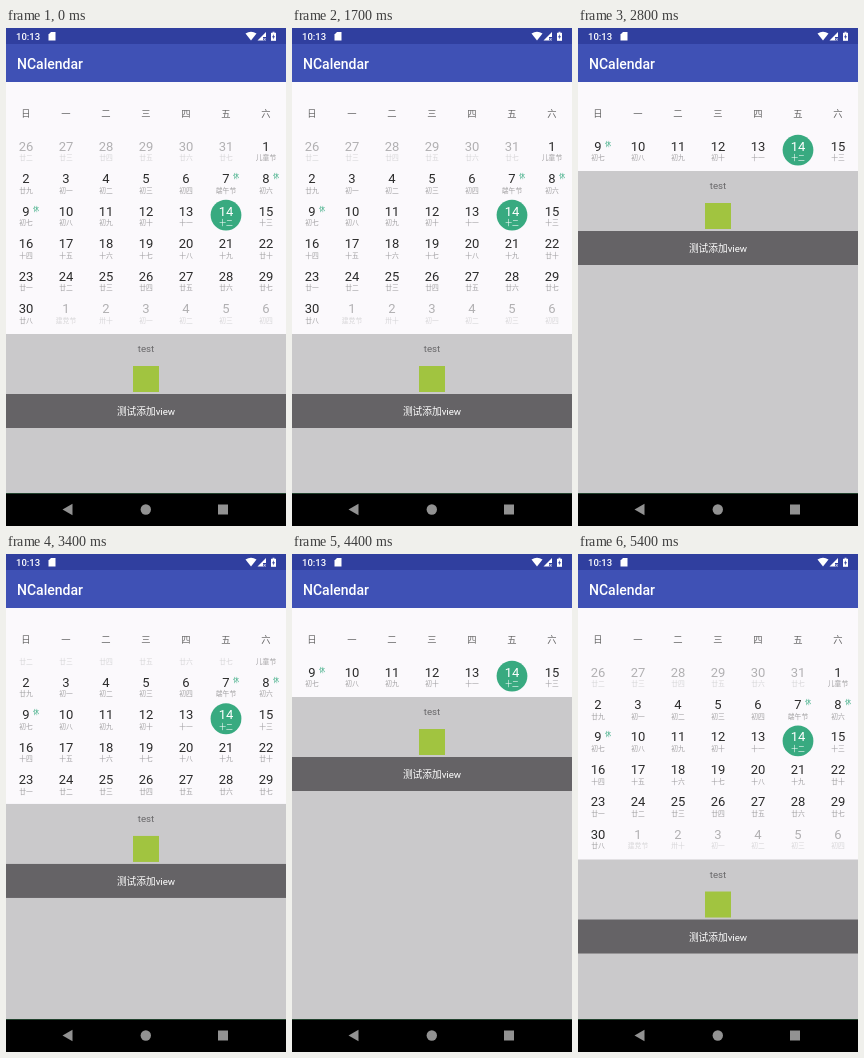
These frames come from a looping animation (280x498 px, 8000 ms). An HTML page with a canvas:

```html
<!DOCTYPE html>
<html lang="zh-CN">
<head>
<meta charset="utf-8">
<style>
html, body { margin: 0; width: 100%; height: 100%; overflow: hidden; background: #000; }
canvas { display: block; width: 280px; height: 498px; }
</style>
</head>
<body>
<canvas id="stage"></canvas>
<script>
const W = 280, H = 498, LOOP = 8000, STEP = 100;
const COL = 40, ROW = 32.45, CLIP_TOP = 102;
const SHEET_OPEN = 306, SHEET_TRAVEL = 163, MONTH_TRAVEL = 65;
const FONTS = 'Roboto, "Noto Sans CJK SC", "Noto Sans CJK", sans-serif';
const GREEN = '#38aa80';

const canvas = document.getElementById('stage');
const ctx = canvas.getContext('2d');
const scale = window.devicePixelRatio || 1;
canvas.width = W * scale;
canvas.height = H * scale;

// [time in ms, how far the month is open]
const OPENNESS = [
  [0, 1], [2400, 1], [2500, 0.975], [2600, 0.7], [2700, 0.2], [2800, 0],
  [3100, 0], [3200, 0.04], [3300, 0.28], [3400, 0.656], [3500, 0.982], [3600, 0.982], [3700, 1],
  [4100, 1], [4200, 0.988], [4300, 0.42], [4400, 0],
  [5100, 0], [5200, 0.06], [5300, 0.6], [5400, 0.997], [LOOP, 0.997]
];

const WEEKDAYS = [...'日一二三四五六'];
const HOLIDAYS = { '6-1': '儿童节', '6-7': '端午节', '7-1': '建党节' };

function lunarName(index) {
  const day = (index + 21) % 30 + 1 - (index < 8 ? 0 : 1);
  const n = index < 8 ? index + 22 : (index - 8) % 30 + 1;
  return (n === 10 ? '初' : '初十廿卅'[Math.floor(n / 10)]) + '一二三四五六七八九十'[(n + 9) % 10];
}

const DAYS = Array.from({ length: 42 }, (_, i) => {
  const date = new Date(2019, 4, 26 + i);
  const month = date.getMonth() + 1, number = date.getDate();
  return {
    number, inMonth: month === 6,
    label: HOLIDAYS[month + '-' + number] || lunarName(i),
    selected: month === 6 && number === 14,
    rest: month === 6 && number >= 7 && number <= 9
  };
});

function opennessAt(time) {
  const t = Math.floor(time / STEP) * STEP;
  const i = OPENNESS.findIndex(k => k[0] > t);
  const [t0, a] = OPENNESS[i - 1], [t1, b] = OPENNESS[i];
  return a + (b - a) * (t - t0) / (t1 - t0);
}

function rect(x, y, w, h, color) {
  ctx.fillStyle = color;
  ctx.fillRect(x, y, w, h);
}

function circle(x, y, r, color) {
  ctx.fillStyle = color;
  ctx.beginPath();
  ctx.arc(x, y, r, 0, Math.PI * 2);
  ctx.fill();
}

function polygon(color, ...points) {
  ctx.fillStyle = color;
  ctx.beginPath();
  points.forEach(([x, y]) => ctx.lineTo(x, y));
  ctx.fill();
}

function text(string, x, baseline, size, color, align = 'center', weight = 400) {
  ctx.font = `${weight} ${size}px ${FONTS}`;
  ctx.textAlign = align;
  ctx.fillStyle = color;
  ctx.fillText(string, x, baseline);
}

function drawHeader() {
  rect(0, 0, W, 16, '#303f9f');
  rect(0, 16, W, 38, '#3f51b5');
  text('10:13', 10, 12, 9.5, '#fff', 'left', 500);
  text('NCalendar', 11, 41, 14, '#fff', 'left', 500);
  polygon('#fff', [45, 4], [49.5, 4], [49.5, 12.5], [42.5, 12.5], [42.5, 6.5]);
  ctx.fillStyle = '#fff';
  ctx.beginPath();
  ctx.moveTo(245, 12.5);
  ctx.lineTo(239.5, 5.5);
  ctx.quadraticCurveTo(245, 1.8, 250.5, 5.5);
  ctx.fill();
  polygon('#fff', [260, 4], [260, 12.5], [251.5, 12.5]);
  rect(257, 9, 3, 3.5, '#303f9f');
  text('×', 258.7, 13, 6, '#fff');
  rect(265, 4.8, 5, 8, '#fff');
  rect(266.5, 3.8, 2, 1, '#fff');
  polygon('#303f9f', [268, 6], [266, 9.2], [267.3, 9.2], [267, 11.5], [269, 8.3], [267.7, 8.3]);
  WEEKDAYS.forEach((name, i) => text(name, 20 + i * COL, 88.7, 9.3, '#666'));
}

function drawDay(day, x, y) {
  if (day.selected) circle(x, y + 4.2, 15.4, GREEN);
  const numberColor = day.selected ? '#fff' : day.inMonth ? '#2b2b2b' : '#b1b0b2';
  const labelColor = day.selected ? '#fff' : day.inMonth ? '#a09fa1' : '#d6d5d7';
  text(day.number, x, y + 4.7, 13, numberColor);
  text(day.label, x, y + 14.4, 6.8, labelColor);
  if (day.rest) text('休', x + 10, y - 0.3, 6.2, GREEN);
}

function drawMonth(open, sheetTop) {
  ctx.save();
  ctx.beginPath();
  ctx.rect(0, CLIP_TOP, W, sheetTop - CLIP_TOP);
  ctx.clip();
  const top = 118 - (1 - open) * MONTH_TRAVEL;
  DAYS.forEach((day, i) => drawDay(day, 20 + i % 7 * COL, top + Math.floor(i / 7) * ROW));
  ctx.restore();
}

function drawSheet(top) {
  rect(0, top, W, 465 - top, '#cac9cb');
  text('test', 140, top + 18, 9.7, '#69686a');
  rect(127, top + 32, 26, 26, '#a1c440');
  rect(0, top + 60, W, 34, '#656366');
  text('测试添加view', 140, top + 81, 9.7, '#fff');
}

function drawNavigation() {
  rect(0, 465, W, H - 465, '#000');
  rect(0, 465, W, 0.7, '#315f43');
  polygon('#929292', [56.5, 481.5], [66.5, 475.8], [66.5, 487.2]);
  circle(139.8, 481.5, 5.2, '#929292');
  rect(212, 476.5, 10, 10, '#929292');
}

function draw() {
  const open = opennessAt(performance.now() % LOOP);
  const sheetTop = SHEET_OPEN - (1 - open) * SHEET_TRAVEL;
  ctx.setTransform(scale, 0, 0, scale, 0, 0);
  rect(0, 0, W, H, '#fbf9fc');
  drawHeader();
  drawMonth(open, sheetTop);
  drawSheet(sheetTop);
  drawNavigation();
  requestAnimationFrame(draw);
}

draw();
</script>
</body>
</html>
```
